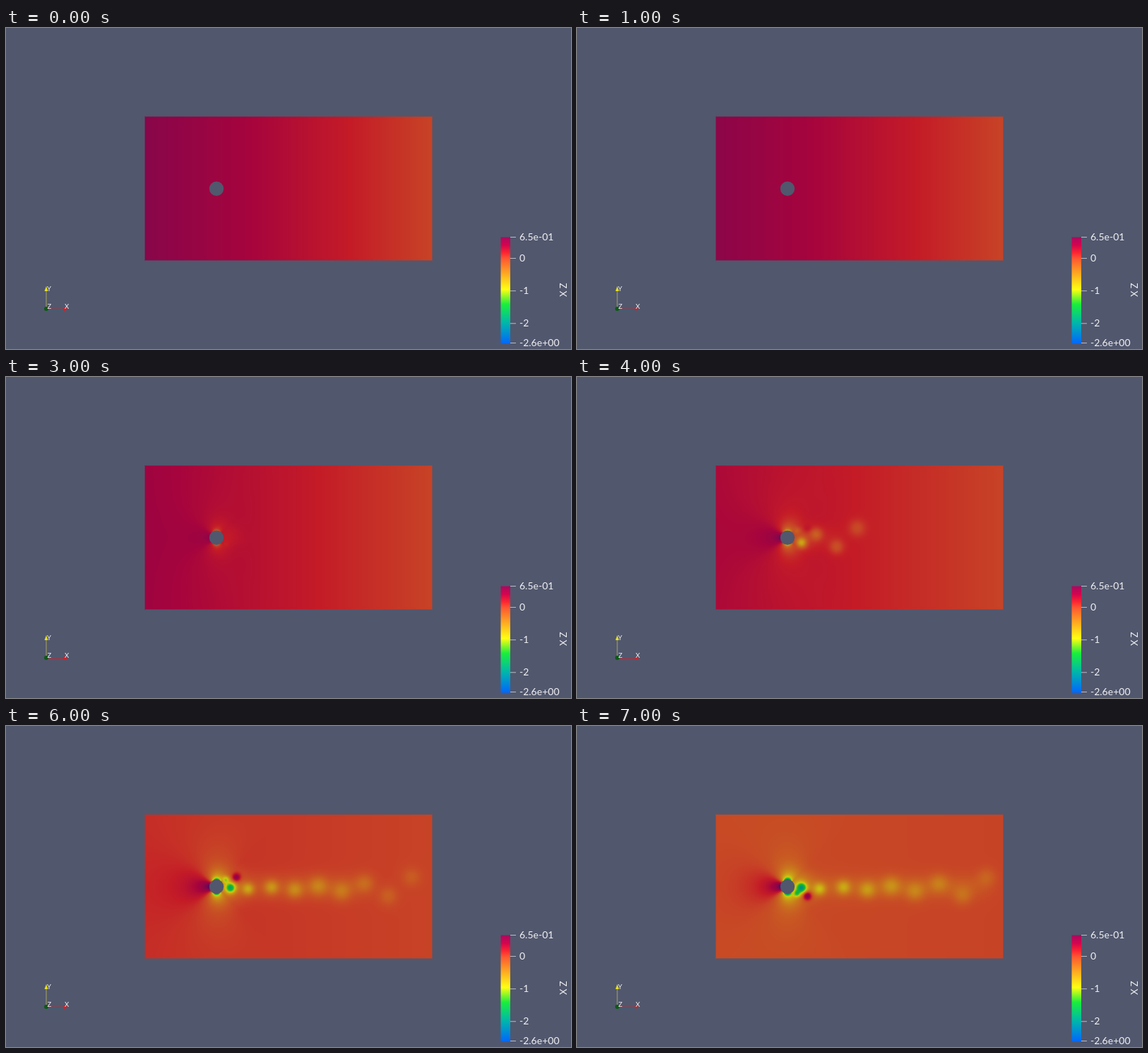
These frames come from a looping animation (800x455 px, 8000 ms). An HTML page with a canvas:

```html
<!DOCTYPE html>
<html lang="en">
<head>
<meta charset="utf-8">
<title>Flow past a cylinder</title>
<style>
  html, body { margin: 0; width: 100%; height: 100%; overflow: hidden; background: #51576d; }
  #stage { position: relative; width: 800px; height: 455px; overflow: hidden; }
  canvas { position: absolute; left: 196px; top: 125px; }
  svg { position: absolute; left: 0; top: 0; }
  text { fill: #f0f0f3; font-family: Lato, "Open Sans", sans-serif; }
  .scale text { font-size: 14px; }
  .axes text { font-size: 9.5px; }
</style>
</head>
<body>
<div id="stage">
  <canvas id="field" width="408" height="205"></canvas>
  <svg width="800" height="455">
    <defs><linearGradient id="ramp" x1="0" y1="0" x2="0" y2="1"></linearGradient></defs>
    <circle cx="298" cy="227.7" r="10.2" fill="#51576d"/>
    <g class="axes">
      <path d="M57 398V372" stroke="#aaa663"/>
      <path d="M57 398.5H84" stroke="#bd2a35"/>
      <path d="M54.5 373L57 366L59.5 373Z" fill="#e6df20"/>
      <path d="M82 396L88 398.5L82 401Z" fill="#dc1c22"/>
      <circle cx="57" cy="398" r="3" fill="#0b5a14"/>
      <text x="58" y="373">Y</text>
      <text x="58.5" y="398">Z</text>
      <text x="83" y="398">X</text>
    </g>
    <g class="scale" id="scale">
      <rect x="700.5" y="296.5" width="13.5" height="151" fill="url(#ramp)"/>
      <text transform="translate(794 381) rotate(-90)" style="font-size:13px">X Z</text>
    </g>
  </svg>
</div>
<script>
const STEP = 1000, COUNT = 8;
const LEFT = 196, TOP = 125, CX = 298, CY = 227.7, R = 10;

// Key colours by pressure drop: 0 is the highest pressure, 5 the lowest
const RAMP = [
  [0, 134, 6, 75], [0.38, 166, 4, 61], [0.72, 196, 27, 39], [1, 199, 67, 38],
  [2.45, 203, 203, 14], [3.15, 20, 186, 48], [4, 0, 144, 132], [5, 0, 80, 204]
];

const mix = (a, b, t) => a + (b - a) * t;
const clamp = (v, lo, hi) => Math.min(hi, Math.max(lo, v));
const bell = (dx, dy, r) => Math.exp(-(dx * dx + dy * dy) / (r * r));

function smooth(from, to, v) {
  const t = clamp((v - from) / (to - from), 0, 1);
  return t * t * (3 - 2 * t);
}

function colour(drop) {
  const u = clamp(drop, -0.5, 5);
  let i = 1;
  while (RAMP[i][0] < u) i++;
  const a = RAMP[i - 1], b = RAMP[i], t = (u - a[0]) / (b[0] - a[0]);
  return [1, 2, 3].map(k => mix(a[k], b[k], t));
}

// Suction above and below the body, stagnation ahead of it
function bodyDrop(dx, dy) {
  const r = Math.max(1, Math.hypot(dx, dy) / R);
  const c = (dx * dx - dy * dy) / (dx * dx + dy * dy + 0.01);
  const far = Math.exp(-r / 8) / r;
  if (c > 0) return dx > 0 ? 0 : -c * 2.1 * far;
  return -c * (1.2 * far + 1.6 / r ** 6);
}

// Evenly spaced vortices that weaken downstream; the oldest ones stray from the axis
function vortexStreet(n, strength) {
  const count = clamp(4 * (n - 3), 0, 9);
  const side = n % 2 ? 1 : -1;
  const spots = [
    { x: 311, y: CY + 10 * side, amp: 1.1 * strength ** 2, r: 5 },
    { x: 326, y: CY + 13 * side, amp: -1.2 * strength ** 3, r: 6 }
  ];
  for (let k = 0; k < count; k++) {
    const age = count - 1 - k;
    spots.push({
      x: 318 + (k && k * (24 + 9 * strength) - 8),
      y: 230 + (age % 2 ? 16 : -16) * Math.exp(-age / 2.5),
      amp: strength * (k ? 1.05 * Math.exp(-0.17 * k) : 2),
      r: Math.min(13, 7 + 1.5 * k)
    });
  }
  return spots;
}

function makeDrop(n) {
  const inlet = 0.02 + 1.06 * (n / 7) ** 1.6;
  const strength = 1.08 * smooth(1, 7, n);
  const front = 70 * (n - 3);
  const spots = vortexStreet(n, strength);
  return (x, y) => {
    const dx = x - CX, dy = y - CY;
    let u = mix(inlet, 1, (x - LEFT) / 407);
    u += strength * (bodyDrop(dx, dy) + 0.75 * bell(dx - 11, dy, 22));
    if (dx > 0) u += 0.22 * strength * bell(0, dy, 17) * smooth(0, 40, dx) * smooth(front + 30, front - 30, dx);
    for (const s of spots) {
      if (Math.abs(x - s.x) < 3 * s.r) u += s.amp * bell(x - s.x, y - s.y, s.r);
    }
    return u;
  };
}

const canvas = document.getElementById("field"), ctx = canvas.getContext("2d");

function render(n) {
  const { width, height } = canvas, img = ctx.createImageData(width, height), drop = makeDrop(n);
  for (let y = 0, i = 0; y < height; y++) {
    for (let x = 0; x < width; x++, i += 4) {
      const edge = x % (width - 1) === 0 || y % (height - 1) === 0;
      img.data.set([...colour(drop(LEFT + x + 0.5, TOP + y + 0.5)), edge ? 110 : 255], i);
    }
  }
  return img;
}

function add(parent, tag, attrs, label = "") {
  const el = document.createElementNS("http://www.w3.org/2000/svg", tag);
  for (const k in attrs) el.setAttribute(k, attrs[k]);
  el.textContent = label;
  parent.append(el);
}

function buildScale() {
  const ramp = document.getElementById("ramp"), scale = document.getElementById("scale");
  for (const [u, ...rgb] of RAMP) {
    const bright = rgb.map(v => Math.min(255, Math.round(v * 1.28)));
    add(ramp, "stop", { offset: u / 5, "stop-color": `rgb(${bright})` });
  }
  for (const label of ["6.5e-01", "0", "-1", "-2", "-2.6e+00"]) {
    const y = 296.5 + (0.65 - label) * 46.15;
    add(scale, "path", { d: `M714 ${y}H722`, stroke: "#b9bbc6" });
    add(scale, "text", { x: 727, y: y + 4.5 }, label);
  }
}

buildScale();
const pictures = Array.from({ length: COUNT }, (_, n) => render(n));
const start = performance.now();
let shown = -1;

function tick() {
  const n = Math.floor((performance.now() - start) / STEP) % COUNT;
  if (n !== shown) ctx.putImageData(pictures[shown = n], 0, 0);
  requestAnimationFrame(tick);
}
tick();
</script>
</body>
</html>
```
